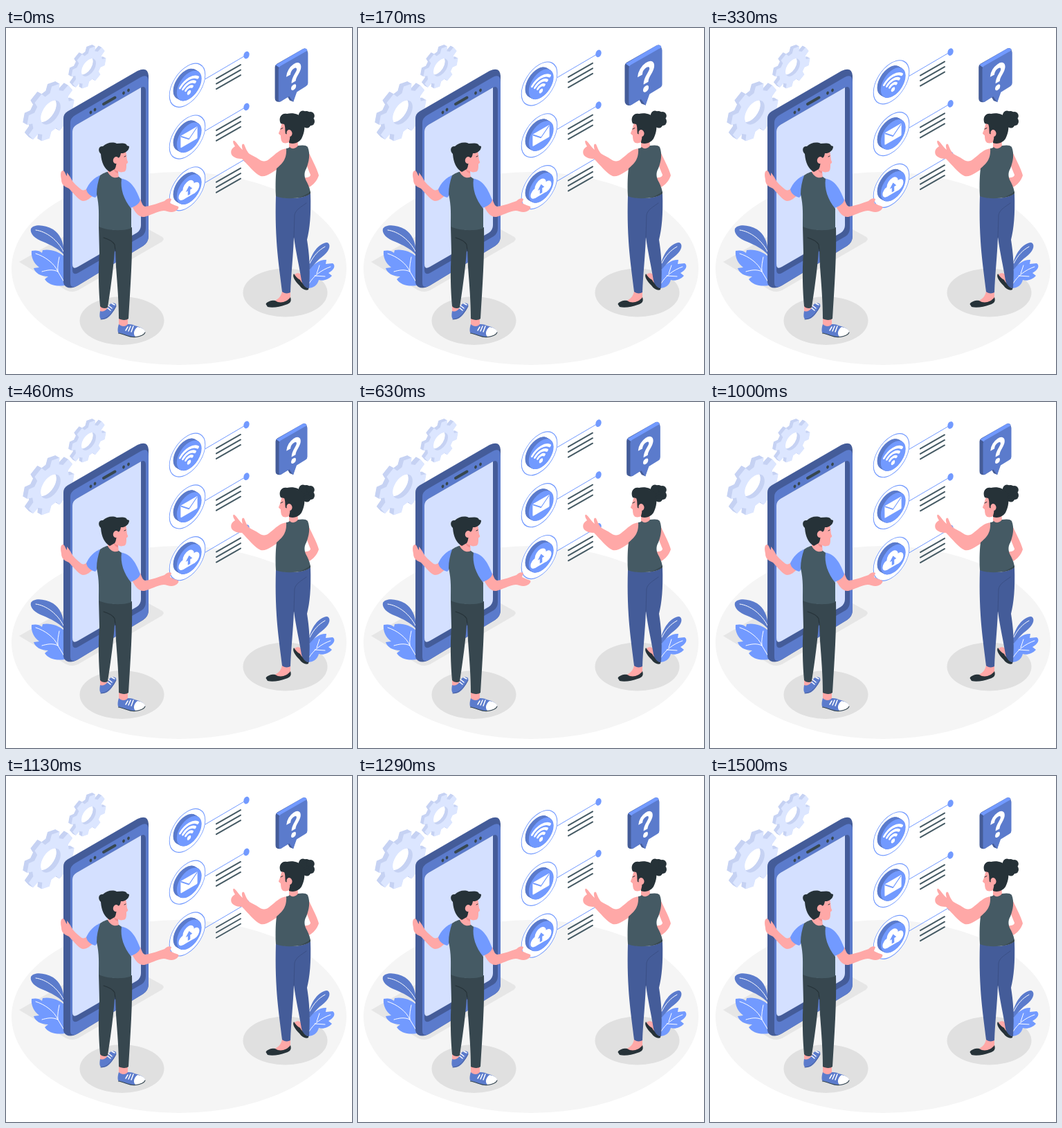
Recreate the animation shown at these times as an HTML page with a canvas. Size 500 by 500 pixels, loop 1540 ms.

```html
<!DOCTYPE html>
<html lang="en">
<head>
<meta charset="utf-8">
<title>App features</title>
<style>
html, body { margin: 0; width: 100%; height: 100%; overflow: hidden; background: #fff; }
canvas { display: block; width: 100vw; height: 100vh; }
</style>
</head>
<body>
<canvas id="stage"></canvas>
<script>
const canvas = document.getElementById('stage');
const ctx = canvas.getContext('2d');

const BLUE = '#729aff', MID = '#5b7bcc', DEEP = '#445c99', SCREEN = '#d4e0ff';
const SKIN = '#ffa8a7', SKIN_SHADE = '#f28f8f', HAIR = '#263238', VEST = '#455a64', PANTS = '#37474f';
const GEAR_FACE = '#dce6ff', GEAR_SIDE = '#c6d2f3';
const LOOP = 1540, FRAMES = 37, PERIOD = 1500;

function fill(d, color) {
  ctx.fillStyle = color;
  ctx.fill(new Path2D(d));
}

function line(d, color, width) {
  ctx.strokeStyle = color;
  ctx.lineWidth = width;
  ctx.stroke(new Path2D(d));
}

function oval(x, y, rx, ry, color, tilt = 0) {
  ctx.fillStyle = color;
  ctx.beginPath();
  ctx.ellipse(x, y, rx, ry, tilt, 0, 7);
  ctx.fill();
}

// Runs draw() in the isometric plane facing right.
function onPlane(x, y, draw) {
  ctx.save();
  ctx.transform(0.866, -0.5, 0, 0.93, x, y);
  draw();
  ctx.restore();
}

// Stacks copies of a plane shape from back to front.
function extrude(x, y, depth, draw) {
  for (let d = depth; d >= 0; d -= 0.5) {
    onPlane(x - d * 0.866, y - d * 0.5, () => draw(d === 0));
  }
}

function gearPath(radius) {
  const path = new Path2D(), teeth = 8, step = Math.PI * 2 / teeth;
  const profile = [[-0.33, 0.77], [-0.22, 1], [0.22, 1], [0.33, 0.77]];
  for (let i = 0; i < teeth; i++) {
    for (const [turn, reach] of profile) {
      const a = (i + 0.28 + turn) * step;
      path.lineTo(Math.cos(a) * radius * reach, Math.sin(a) * radius * reach);
    }
  }
  path.closePath();
  path.moveTo(radius * 0.42, 0);
  path.arc(0, 0, radius * 0.42, 0, 7);
  return path;
}

function gear(x, y, radius) {
  const path = gearPath(radius);
  extrude(x, y, Math.round(radius * 0.17), front => {
    ctx.fillStyle = front ? GEAR_FACE : GEAR_SIDE;
    ctx.fill(path, 'evenodd');
  });
}

function floor() {
  oval(250, 347.5, 242, 139.5, '#f5f5f5');
  oval(167.5, 423, 61, 35, '#e0e0e0');
  oval(403.5, 382.5, 61, 35, '#e0e0e0');
  fill('M19 338 L84 301 L206 291 L226 302 Q230 305 225 309 L104 379 Q95 383 87 379Z', '#e6e6e6');
}

function plants() {
  fill('M84 328 C75 318 65 314 54 309 C42 305 34 297 36 290 C40 283 56 284 68 291 C78 298 83 308 84 324Z', MID);
  line('M43 292 C59 294 75 307 83 323', '#fff', 1);
  fill('M84 330 C76 323 64 319 53 321 L52 325 C48 321 42 321 37 322 C36 331 40 340 48 346 L40 347 C42 354 50 359 61 359 L56 363 C61 371 72 374 85 372Z', BLUE);
  line('M43 326 C56 330 70 340 75 352 L84 367 M75 352 C74 344 76 337 77 331 M75 352 C67 348 59 350 52 352', '#fff', 1);
  fill('M437 346 C440 326 452 311 464 310 C470 312 468 321 460 328 C450 336 444 341 440 352Z', MID);
  line('M439 340 C445 328 452 321 461 316', '#fff', 1);
  fill('M436 376 L437 352 C444 340 455 334 463 335 L462 341 L472 340 C477 343 474 350 466 354 L471 358 C466 364 457 366 452 364 C450 372 444 376 436 376Z', BLUE);
  line('M438 369 C445 358 455 350 469 345 M449 355 L453 343 M446 358 L461 359', '#fff', 1);
}

function phone() {
  fill('M83 131 Q83 124 89 120.500 L190 62 Q205 55 206 69 L206 300 Q206 310 198 315 L104 372 Q94 378 87 374 Q83 371 83 367Z', DEEP);
  fill('M93 137 Q93 130 100 126 L194 71.500 Q206 65 206 78 L206 300 Q206 310 198 315 L104 372 Q93 378 93 368Z', MID);
  fill('M96 150 Q96 143 102 139.700 L194 86.500 Q202 82 202 91 L202 289 Q202 297 196 301 L104 354 Q96 358 96 349Z', DEEP);
  fill('M96 150 Q96 143 102 139.700 L195 86 L195 285 Q195 292 189 296 L104 345 Q96 350 96 341Z', SCREEN);
  line('M141 110 L157.500 100.500', PANTS, 4);
  for (const [x, y] of [[122.5, 122], [128.5, 118], [170, 94], [177, 90]]) {
    oval(x, y, 1.8, 2.4, PANTS, 0.4);
  }
}

function wifi() {
  ctx.strokeStyle = '#fff';
  ctx.lineWidth = 4;
  for (const r of [7.5, 14, 20.5]) {
    ctx.beginPath();
    ctx.arc(0, 10, r, -Math.PI / 2 - 0.8, -Math.PI / 2 + 0.8);
    ctx.stroke();
  }
  oval(0, 11, 3.2, 3.2, '#fff');
}

function mail() {
  ctx.fillStyle = '#fff';
  ctx.beginPath();
  ctx.roundRect(-14, -9.5, 28, 19, 1.5);
  ctx.fill();
  line('M-13 -8 L0 3 L13 -8', BLUE, 1.6);
}

function cloud() {
  oval(-9.5, 4, 8, 7.5, '#fff');
  oval(-1, -3.5, 9.5, 9.5, '#fff');
  oval(9.5, 3.5, 7.8, 8, '#fff');
  ctx.fillStyle = '#fff';
  ctx.fillRect(-10, 2, 20, 9.5);
  fill('M0 -5 L5.5 2 L2 2 L2 9 L-2 9 L-2 2 L-5.5 2Z', BLUE);
}

function feature(y, drawIcon) {
  line(`M288 ${y - 9} L346 ${y - 43}`, BLUE, 1);
  oval(347.5, y - 43.7, 4, 5.5, BLUE, 0.35);
  onPlane(262, y, () => {
    oval(0, 0, 29.8, 29.8, '#fff');
    ctx.strokeStyle = BLUE;
    ctx.lineWidth = 1.1;
    ctx.stroke();
  });
  extrude(264.7, y + 0.8, 6, front => oval(0, 0, 20.7, 20.7, front ? BLUE : MID));
  onPlane(264.5, y + 0.2, drawIcon);
  for (let i = 0; i < 3; i++) {
    const top = y - 9.7 + i * 7.5;
    line(`M304 ${top} L339 ${top - 20}`, VEST, 2);
  }
}

function bubble(scale) {
  ctx.save();
  ctx.translate(412.5, 68);
  ctx.scale(scale, scale);
  ctx.translate(-412.5, -68);
  fill('M389.500 57 Q389.500 54 392 52.500 L429 31.500 Q432 30 434 32.500 L435 36 L419 92 L415 105 L410 103 L407 98 L397 105 Q393 106 391 104 Q389.500 103 389.500 100Z', DEEP);
  fill('M390.500 54 L429 31.500 Q432 30 434.500 33 L433 37 L396 58Z', BLUE);
  fill('M394.500 60 Q394.500 57 397 55.500 L432 35.500 Q435.500 34 435.500 38 L435.500 79 Q435.500 82 433 83.500 L420 91.500 L415 105.500 L409.500 97.500 L398 104.500 Q394.500 106 394.500 102Z', MID);
  onPlane(415.5, 70, () => {
    ctx.lineCap = 'butt';
    line('M-8.500 -5.500 C-8 -17.500 8.500 -18 8.500 -8 C8.500 -1 0 -1 0 8.500', '#fff', 6.8);
    oval(0, 16, 4, 4, '#fff');
  });
  ctx.restore();
}

function man() {
  // far arm
  fill('M82 206 C78 207 79 214 80 219 C80 226 84 229 91 232 C98 239 105 249 111 250 C118 250 122 245 126 242 L118 231 C113 236 110 235 107 232 C102 228 98 224 96 221 C93 216 91 212 88 209 L88 214 C86 212 85 206 82 206Z', SKIN);
  fill('M140 212 C127 214 119 226 116 233 C117 239 122 243 129 245 L138 234Z', BLUE);
  // shoes and ankles
  fill('M136 401 L148 402 L147 410 C143 414 138 413 136 411Z M163 418 L176 419 L176 431 C171 434 166 434 163 430Z', SKIN);
  fill('M136 409 C135 415 135 420 138 421 C145 422 151 416 154 411 C158 406 160 401 159 399 C155 396 150 398 148 402 C146 408 140 411 136 409Z', MID);
  line('M137 421 C146 421 153 413 159 402', DEEP, 1);
  line('M148 401 L153 405 M146 404 L151 408 M153 398 L157 400', '#fff', 1.5);
  fill('M163 428 C161 434 161 440 163 441 C170 442 176 447 185 447 C193 447 201 443 201 439 C199 433 190 431 186 430 C182 428 178 428 176 428 C173 432 167 432 163 428Z', MID);
  fill('M190 432 C196 433 201 436 201 439 C200 444 194 446 187 446 C183 442 185 436 190 432Z', '#fff');
  line('M162.500 441 C171 442 178 447.500 187 446.500 C194 446 200 443 201 440', PANTS, 1.1);
  line('M176 432 L173 437 M180 431 L177 438 M184 431 L181 439', '#fff', 1.5);
  // trousers
  fill('M134 286 C150 293 170 293 182 288 C183 330 180 370 177 420 C174 423 166 422 163 420 C163 395 161 372 159 345 L158 319 L157 319 C156 342 151 378 147 404 C143 406 138 405 136 402 C134 380 133 350 135 325Z', PANTS);
  line('M141 303 C148 305 154 308 157 313 L158 322', HAIR, 1.1);
  // near arm
  fill('M181 256 L194 247 C197 255 198 257 201 258 C211 257 222 252 229 250 C232 247 236 245 239 247 C239 249 237 251 237 253 C241 255 246 257 249 258 C251 261 245 266 239 266 C235 266 231 264 228 264 C218 265 208 271 200 273 C191 274 186 265 181 256Z', SKIN);
  fill('M163 217 C179 218 187 230 194 249 C192 255 186 258 180 260 C171 252 164 236 163 217Z', BLUE);
  // head
  fill('M157 181 L173 178 C175 185 174 190 176 193 C177 195 174 196 174 197 C174 203 174 208 169 208 C166 209 164 208 162 207 L163 216 C158 220 150 217 147 213 L147 200Z', SKIN);
  fill('M162 207 C159 206 157 205 155 203 C157 208 160 210 162 210Z', SKIN_SHADE);
  // vest
  fill('M136 213 C140 210 145 208 147 208 C151 216 158 218 163 215 L167 218 C165 232 170 248 181 261 L181 289 C175 293 148 294 134 287 C134 270 135 258 131 240 C131 230 133 222 136 213Z', VEST);
  // hair
  fill('M150 208 C142 203 138 195 137 182 C132 177 134 170 140 171 C145 166 154 164 160 167 C166 167 173 165 175 170 L178 171 C178 176 175 178 172 180 C170 181 168 181 166 181 C165 186 164 188 161 188 C159 194 160 200 157 204Z', HAIR);
  oval(159, 191, 4.2, 5, SKIN, 0.2);
  line('M171 186 L173 185', HAIR, 1);
}

function woman() {
  // far arm
  fill('M435 174 C440 186 450 204 452 213 C450 220 444 227 438 230 L430 216 C438 217 440 214 440 212 C437 205 433 195 432 188Z', SKIN);
  // feet
  fill('M417 356 C421 353 426 354 427 358 L436 374 L430 374 C424 370 419 362 417 356Z M399 380 L411 382 L411 392 C406 398 394 401 387 395 C393 392 398 388 399 380Z', SKIN);
  fill('M416 355 C413 359 418 366 424 372 C428 378 434 380 437 378 L438 371 C431 372 427 368 425 364 C421 362 418 358 416 355Z', HAIR);
  fill('M375.500 399 C377 395 385 393 389 394 C396 399 406 396 411 389 C413 395 411 398 404 400 C396 403 385 405 378 403Z', HAIR);
  // trousers
  fill('M390 242 C405 248 430 247 440 239 C441 270 439 290 435 306 C438 325 440 345 438 376 C434 377 429 372 427 365 C424 345 419 325 416 302 C415 330 412 355 411 382 C408 384 402 384 399 381 C395 345 388 310 390 242Z', DEEP);
  line('M434 253 C426 259 419 262 417 270 L416 303', '#3a4f85', 1);
  // head
  fill('M399 136 C397 143 396 148 394 152 C394 154 397 154 397 156 C397 160 398 165 401 166 C404 167 407 166 409 165 L409 175 C414 179 422 175 422 170 L420 150 L405 136Z', SKIN);
  oval(434, 132, 9.5, 12, HAIR);
  oval(429, 126, 6, 6.5, HAIR);
  oval(440, 127, 5.8, 6, HAIR);
  oval(441, 135, 5, 6, HAIR);
  oval(435, 139, 5, 5.5, HAIR);
  fill('M397 138 C393 130 398 122 406 124 C414 122 424 124 428 130 C434 140 431 152 427 160 C422 167 415 168 409 166 C409 162 412 158 409 154 L404 153 C403 148 404 143 402 139Z', HAIR);
  oval(409.5, 152, 4, 5, SKIN, -0.2);
  line('M397 146 L400 144.500', HAIR, 1);
  // pointing arm
  fill('M407 174 C396 174 389 183 382 188 C376 194 370 193 366 190 C360 186 355 184 352 182 C348 179 346 172 344 168 C341 166 340 170 342 176 C337 172 334 166 330 163 C327 162 328 167 331 171 C326 174 324 178 326 183 C329 188 336 189 341 189 C350 198 359 210 368 214 C377 216 386 207 396 202 L409 188Z', SKIN);
  // vest
  fill('M405 174 C407 174 409 173 410 172 C414 176 419 174 422 170 C428 169 434 169 436 172 C440 182 438 193 434 203 C430 210 431 216 435 223 C438 229 440 235 440 239 C432 246 405 249 390 243 C389 225 390 210 391 203 C399 196 406 190 405 174Z', VEST);
  fill('M440 236 L440 239 C435 243 428 245 421 245.500 C430 243 436 240 440 236Z', PANTS);
}

// Two beats per period, the second starting at 40%.
function beat(p) {
  const pulse = (start, peak, end) =>
    Math.max(0, Math.min((p - start) / (peak - start), (end - p) / (end - peak)));
  return 1 + 0.185 * (pulse(0, 0.13, 0.3) + pulse(0.4, 0.54, 0.67));
}

function render(time) {
  const ratio = window.devicePixelRatio || 1;
  const w = Math.round(innerWidth * ratio), h = Math.round(innerHeight * ratio);
  if (canvas.width !== w || canvas.height !== h) {
    canvas.width = w;
    canvas.height = h;
  }
  const step = Math.floor((time % LOOP + 2) / (LOOP / FRAMES));
  const phase = (step + 1) / 24 * 1000 / PERIOD;
  const lift = 10 * Math.max(0, 1 - Math.abs(phase * 2 - 1));

  ctx.setTransform(w / 500, 0, 0, h / 500, 0, 0);
  ctx.fillStyle = '#fff';
  ctx.fillRect(0, 0, 500, 500);
  ctx.lineCap = ctx.lineJoin = 'round';
  floor();
  gear(64.5, 122, 39.5);
  gear(119.5, 57, 29);
  plants();
  phone();
  [wifi, mail, cloud].forEach((icon, i) => feature(83.3 + i * 74.8 - lift, icon));
  bubble(beat(phase));
  man();
  woman();
}

const start = performance.now();
function tick() {
  render(performance.now() - start);
  requestAnimationFrame(tick);
}
tick();
</script>
</body>
</html>
```
